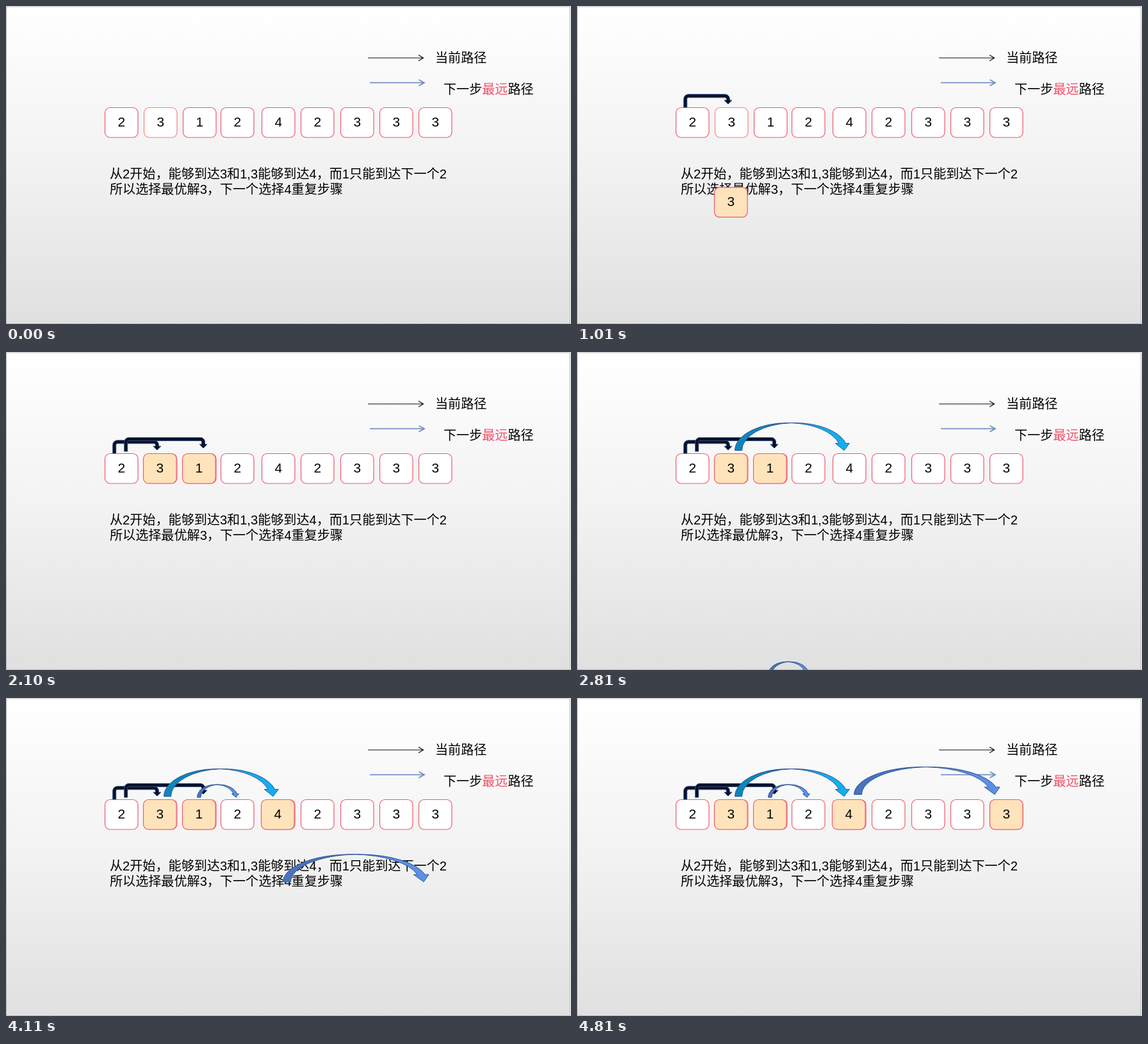
Animation, 882 px wide and 496 px high, one loop 5300 ms. Source, as an HTML page:

```html
<!DOCTYPE html>
<html lang="zh-CN">
<head>
<meta charset="utf-8">
<title>最远路径</title>
<style>
  html, body { margin: 0; width: 100%; height: 100%; overflow: hidden; background: #fff; }
  svg { display: block; width: 882px; height: 496px; }
  text { font: 20.1px "Liberation Sans", "Noto Sans CJK SC", "Noto Sans CJK", sans-serif; fill: #000; }
  .digit { text-anchor: middle; font-size: 20.8px; }
  .uturn { fill: #0a1022; stroke: #2a4c8c; stroke-width: 1; }
  .arc { stroke: #2f5597; stroke-width: 1; stroke-linejoin: round; }
</style>
</head>
<body>
<svg id="stage" viewBox="0 0 882 496" xmlns="http://www.w3.org/2000/svg">
  <defs>
    <linearGradient id="paper" x2="0" y2="1">
      <stop offset="0" stop-color="#fff"/>
      <stop offset=".5" stop-color="#f2f2f2"/>
      <stop offset="1" stop-color="#e0e0e0"/>
    </linearGradient>
    <linearGradient id="cyan">
      <stop offset=".5" stop-color="#0f86ba"/>
      <stop offset=".5" stop-color="#12aef0"/>
    </linearGradient>
    <linearGradient id="blue">
      <stop offset=".5" stop-color="#4a74ba"/>
      <stop offset=".5" stop-color="#5c90e4"/>
    </linearGradient>
  </defs>
  <rect x=".5" y="1" width="880" height="494.5" fill="url(#paper)" stroke="#b4b4b4"/>
  <path d="M565 81H651M644 76.5L651.5 81L644 85.5" fill="none" stroke="#111" stroke-width="1.2"/>
  <path d="M568 119.7H652M644.5 115L653 119.7L644.5 124.4" fill="none" stroke="#7391c6" stroke-width="1.8"/>
  <text x="670" y="88">当前路径</text>
  <text x="683" y="136.5">下一步<tspan fill="#f0506a">最远</tspan>路径</text>
  <g id="row"></g>
  <text x="162" y="269">从2开始，能够到达3和1,3能够到达4，而1只能到达下一个2</text>
  <text x="162" y="293">所以选择最优解3，下一个选择4重复步骤</text>
  <g id="movers"></g>
</svg>
<script>
const LOOP = 5300;

const cell = (x, digit, fill = '#fff', stroke = '#ee5a6e') =>
  `<rect x="${x}" y="158.5" width="51.5" height="46.5" rx="8" fill="${fill}" stroke="${stroke}" stroke-width="1.2"/>
   <text class="digit" x="${x + 25.7}" y="188">${digit}</text>`;

const picked = (x, digit) => cell(x, digit, '#ffe3bb');

// Squared arrow: up from (x, base), across at top, down to a tip.
const uturn = (x, right, top, base, tip) => {
  const w = 5, neck = tip - 6;
  return `<path class="uturn" d="M${x} ${base}V${top + 7}a7 7 0 0 1 7 -7H${right - 7}a7 7 0 0 1 7 7V${neck}
    h3.5L${right - w / 2} ${tip}L${right - w - 3.5} ${neck}h3.5V${top + 7}a2 2 0 0 0 -2 -2
    H${x + 7}a2 2 0 0 0 -2 2V${base}Z"/>`;
};

// Curved arrow made of two equal ellipses, one shifted right by the thickness.
const arc = (x, tip, top, base, thick, head, fill) => {
  const rx = (tip - x - thick / 2) / 2, ry = base - top;
  const c1 = x + rx, c2 = c1 + thick, mid = c1 + thick / 2;
  const neck = base - head;
  const reach = rx * Math.sqrt(1 - (head / ry) ** 2);
  const cross = base - ry * Math.sqrt(1 - (thick / 2 / rx) ** 2);
  const to = (sweep, px, py) => `A${rx} ${ry} 0 0 ${sweep} ${px} ${py}`;
  return `<path class="arc" fill="url(#${fill})" d="M${x} ${base}${to(1, c1, top)}H${c2}${to(1, c2 + reach, neck)}
    H${mid + reach + thick}L${tip} ${base}L${mid + reach - thick} ${neck}H${c1 + reach}
    ${to(0, mid, cross)}${to(0, x + thick, base)}Z"/>`;
};

const digits = [2, 3, 1, 2, 4, 2, 3, 3, 3];
const lefts = [154.5, 215.5, 276.5, 335.5, 399.5, 460.5, 522.5, 583.5, 644.5];
document.getElementById('row').innerHTML =
  digits.map((d, i) => cell(lefts[i], d, '#fff', i === 1 ? '#f5857c' : undefined)).join('');

// Each part flies up from below the stage: start, end, distance, drawing.
const moves = [
  [130, 630, 359, uturn(166.7, 238.3, 137.8, 158, 153)],
  [634, 1134, 338, picked(214.5, 3)],
  [1145, 1645, 362, uturn(184.7, 310.5, 133.4, 155, 150)],
  [1690, 2100, 338, picked(275.5, 1)],
  [2230, 2655, 386, arc(246.5, 417, 110.5, 153.5, 11, 11, 'cyan')],
  [2795, 3185, 362, arc(298.5, 359, 135, 155, 5.5, 5.5, 'blue')],
  [3320, 3790, 338, picked(398.5, 4)],
  [3832, 4260, 389, arc(432.5, 652, 107.5, 150.5, 12, 11.5, 'blue')],
  [4355, 4810, 338, picked(644.5, 3)]
];
const holder = document.getElementById('movers');
holder.innerHTML = moves.map(m => `<g>${m[3]}</g>`).join('');
const groups = [...holder.children];

// The picture advances in discrete steps: first, last, count.
const bursts = [
  [170, 640, 7], [720, 1170, 7], [1260, 1790, 8], [1870, 2100, 4], [2270, 2660, 6],
  [2810, 3190, 6], [3340, 3800, 7], [3880, 4260, 6], [4430, 4810, 6]
];
const ticks = [0];
for (const [first, last, n] of bursts)
  for (let i = 0; i < n; i++)
    ticks.push(Math.round((first + (last - first) * i / (n - 1)) / 10) * 10);

function draw(time) {
  const now = time % LOOP;
  const t = ticks.filter(k => k <= now).pop();
  moves.forEach(([start, end, dist], i) => {
    const left = Math.min(1, Math.max(0, (end - t) / (end - start)));
    groups[i].setAttribute('visibility', t > start ? 'visible' : 'hidden');
    groups[i].setAttribute('transform', `translate(0 ${(dist * left).toFixed(2)})`);
  });
}

const begin = performance.now();
function loop() {
  draw(Math.max(0, performance.now() - begin));
  requestAnimationFrame(loop);
}
loop();
</script>
</body>
</html>
```
